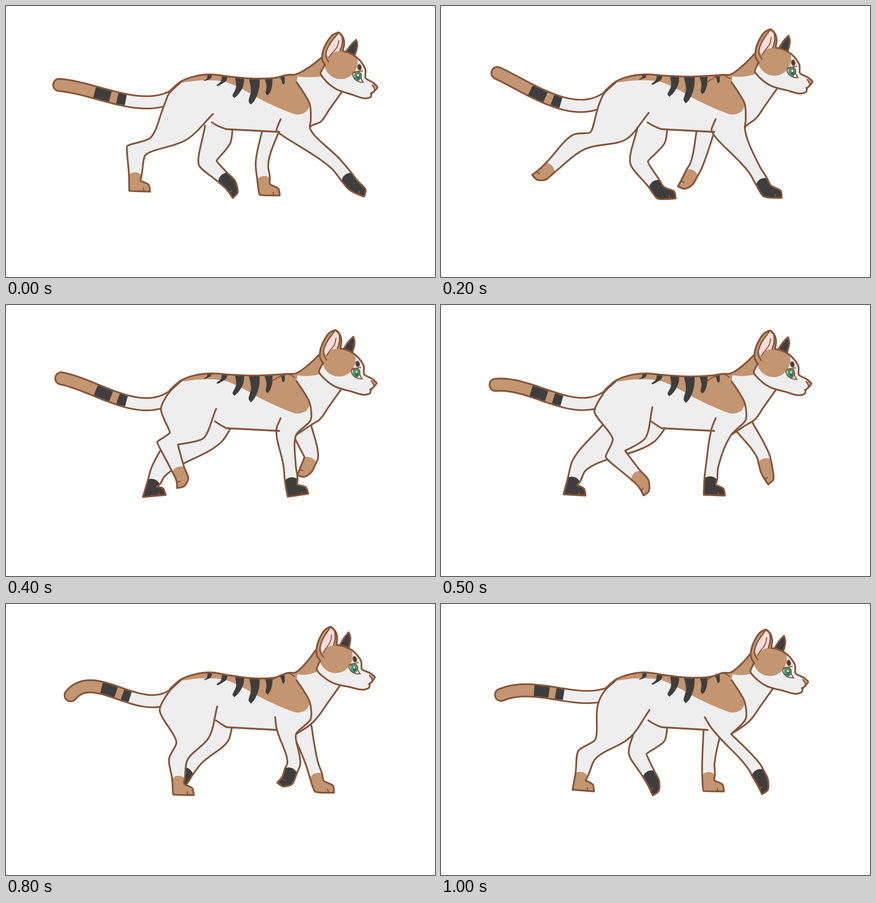
Write an HTML page with a canvas that moves like this. It is 942 px wide and 594 px high and loops after 1100 ms.

```html
<!DOCTYPE html>
<html lang="en">
<head>
<meta charset="utf-8">
<title>Walking cat</title>
<style>
html, body { margin: 0; width: 100%; height: 100%; overflow: hidden; background: #fff; }
canvas { display: block; width: 942px; height: 594px; }
</style>
</head>
<body>
<canvas id="stage" width="942" height="594"></canvas>
<script>
const ctx = document.getElementById('stage').getContext('2d');
const LINE = '#855438', TAN = '#c39570', DARK = '#3e3e3e', FUR = '#eeeeee', PINK = '#fbdcdb';
const STEP = 100, STEPS = 11;

// Key steps of the walk; the steps between are eased.
const keys = [0, 2, 3, 5, 7, 8, 10];

// Leg keys: hock (or wrist) x, y, ball of the paw x, y, toe angle in degrees.
const hindNear = [
  [286,317, 283,394, 3], [303,298, 222,370, 150], [325,283, 318,376, 115], [383,326, 444,390, 65],
  [395,337, 440,404, 3], [378,341, 379,406, 3], [320,331, 303,397, 5]
];
const hindFar = [
  [443,344, 493,392, 58], [435,343, 482,409, 3], [377,369, 363,411, 3], [303,352, 284,405, 3],
  [338,302, 290,382, 160], [415,340, 386,386, 170], [432,328, 467,393, 70]
];
const foreNear = [
  [725,347, 763,393, 28], [688,358, 716,405, 8], [655,350, 671,405, 3], [595,355, 590,405, 3],
  [596,350, 570,373, 162], [632,350, 617,387, 138], [689,358, 706,390, 68]
];
const foreFar = [
  [562,345, 568,402, 4], [560,350, 540,386, 125], [624,342, 595,365, 162], [708,332, 716,365, 62],
  [700,352, 728,400, 6], [672,350, 688,399, 6], [587,350, 588,398, 3]
];
// Ear tip x, y and tilt of the head.
const head = [
  [731,58,3.4], [724,51,0], [724,53,.8], [723,56,.8], [717,53,-.8], [713,50,-2.7], [714,56,-.2]
];
// Tail tip x, y, angle at the tip, depth of the sag.
const tail = [
  [117,173,5,240], [124,147,25,258], [124,147,25,258], [120,175,-5,258],
  [127,179,-35,294], [142,200,-50,258], [132,199,-22,226]
];

function at(rows, step) {
  const k = keys.indexOf(step);
  if (k >= 0) return rows[k];
  const i = keys.findIndex(v => v > step);
  const a = rows[i - 1], b = rows[i], p = rows[(i + 5) % 7], n = rows[(i + 1) % 7];
  return a.map((v, j) => (v + b[j]) / 2 + (v + b[j] - p[j] - n[j]) / 16);
}

const add = (p, d, l) => [p[0] + d[0] * l, p[1] + d[1] * l];
const mix = (a, b, t) => [a[0] + (b[0] - a[0]) * t, a[1] + (b[1] - a[1]) * t];
const polar = deg => [Math.cos(deg * Math.PI / 180), Math.sin(deg * Math.PI / 180)];
const rear = d => [-d[1], d[0]];
function unit(x, y) {
  const l = Math.hypot(x, y) || 1;
  return [x / l, y / l];
}
const heading = (a, b) => unit(b[0] - a[0], b[1] - a[1]);

// Smooth curve that turns into corners where the points bend sharply.
function curve(path, pts, join) {
  const last = pts.length - 1;
  const dirs = pts.slice(1).map((p, i) => heading(pts[i], p));
  const pull = pts.map((p, i) => {
    const u = dirs[Math.max(i - 1, 0)], v = dirs[Math.min(i, last - 1)];
    const c = Math.max(0, u[0] * v[0] + u[1] * v[1]);
    return add([0, 0], unit(u[0] + v[0], u[1] + v[1]), c * .36);
  });
  join ? path.lineTo(...pts[0]) : path.moveTo(...pts[0]);
  for (let i = 0; i < last; i++) {
    const a = pts[i], b = pts[i + 1], l = Math.hypot(b[0] - a[0], b[1] - a[1]);
    path.bezierCurveTo(...add(a, pull[i], l), ...add(b, pull[i + 1], -l), ...b);
  }
  return path;
}
const shape = pts => curve(new Path2D(), pts);
const smooth = (...flat) => shape(flat.filter((v, i) => i % 2 === 0).map((x, i) => [x, flat[2 * i + 1]]));

function fill(path, color) { ctx.fillStyle = color; ctx.fill(path); }
function ink(path, width = 3.8, color = LINE) {
  ctx.strokeStyle = color;
  ctx.lineWidth = width;
  ctx.stroke(path);
}
function oval(x, y, rx, ry, turn = 0) {
  const p = new Path2D();
  p.ellipse(x, y, rx, ry, turn, 0, 7);
  return p;
}

// Rear and front edge points of a joint between two bone directions.
function sides(p, u, v, r) {
  const n = rear(unit(u[0] + v[0], u[1] + v[1]));
  const miter = r * (1 + .3 * (1 - u[0] * v[0] - u[1] * v[1]));
  return [add(p, n, miter), add(p, n, -miter)];
}

// Lower leg and paw around the bones, joined to the upper outline on both ends.
function limb([kx, ky, bx, by, angle], root, girth, color, before, after) {
  const knee = [kx, ky], ball = [bx, by], toe = polar(angle);
  const shin = heading(knee, ball), ankle = add(ball, shin, -24);
  const tip = add(ball, toe, 15 + 15 * Math.max(0, toe[0]));
  const k = sides(knee, heading(root, knee), shin, girth);
  const a = sides(ankle, shin, shin, 14), b = sides(ball, shin, toe, 13);
  const sole = add(add(tip, rear(toe), 11), toe, 4), nail = add(tip, rear(toe), -4);
  const paw = [a[0], b[0], sole, nail, b[1], a[1]];
  const outline = shape([...before, k[0], ...paw, k[1], ...after]);
  const sock = shape(paw);
  sock.quadraticCurveTo(...add(ankle, shin, -11), ...a[0]);
  const split = shape([add(sole, toe, -13), add(add(sole, toe, -15), rear(toe), -6)]);
  return {
    paint() { fill(outline, FUR); fill(sock, color); },
    line() { ink(outline); ink(split, 2.6); }
  };
}

function nearHind(key) {
  const s = key[0] - 290;
  const rump = [348 - s * .12, 215 + s * .2], stifle = [400 + s * .52, 292];
  const groin = [455 + s * .1, 236 - s * .13];
  const calf = mix([key[0], key[1]], [368, 243], .38);
  const leg = limb(key, mix(rump, stifle, .5), 20, TAN,
    [[384, 167], [358, 192], rump, calf], [stifle, groin]);
  return { leg, groin };
}

function farHind(key) {
  const haunch = [360 + (key[0] - 310) * .58, 262], stifle = [413 + key[0] * .18, 300];
  return limb(key, mix(haunch, stifle, .5), 17, DARK, [haunch], [stifle, [498, 262]]);
}

function farFore(key) {
  const x = 562 + (key[0] - 560) * .55;
  const front = [Math.min(x + 45, 682), 254];
  return limb(key, mix([x, 270], front, .5), 13.5, TAN, [[x, 270]], [front]);
}

function drawTail([x, y, angle, sag]) {
  const tip = [x, y], c = [tip, add(tip, polar(angle), 85), [300, sag], [374, 194]];
  const pts = [];
  for (let t = 0; t <= 1.001; t += .05) {
    const u = 1 - t, w = [u * u * u, 3 * u * u * t, 3 * u * t * t, t * t * t];
    pts.push([0, 1].map(k => w.reduce((s, v, i) => s + v * c[i][k], 0)));
  }
  const length = pts.reduce((s, p, i) => i ? s + Math.hypot(p[0] - pts[i - 1][0], p[1] - pts[i - 1][1]) : 0, 0);
  const path = shape(pts);
  const band = (from, to, color) => {
    ctx.setLineDash([0, from * length, (to - from) * length, 999]);
    ink(path, 23.2, color);
  };
  ink(path, 30.6);
  ink(path, 23.2, TAN);
  ctx.lineCap = 'butt';
  band(.53, 1.2, FUR);
  band(.3, .435, DARK);
  band(.495, .567, DARK);
  ctx.setLineDash([]);
  ctx.lineCap = 'round';
}

// Claw-shaped stripes, longest in the middle of the back.
function drawStripes(y) {
  for (let i = 0; i < 6; i++) {
    const bell = Math.exp(-(((i - 2.9) / 1.6) ** 2));
    const x = 447 + 34 * i - .45 * i * i, w = 9 + 16 * bell, h = 8 + 54 * bell;
    const lean = (i - 4) * 5 * Math.min(1, h / 20);
    const p = (side, part, down) => [x + side * w + part * lean, y + down * h];
    const stripe = shape([p(.5, 0, 0), p(.46, .2, .45), p(.2, .8, .85), p(-.08, 1, 1),
      p(-.28, 1, .9), p(-.2, .4, .5), p(-.5, 0, 0)]);
    stripe.lineTo(x - w / 2, y - 10);
    stripe.lineTo(x + w / 2, y - 10);
    fill(stripe, DARK);
  }
}

function drawHead(x, y, tilt) {
  ctx.save();
  ctx.translate(x, y);
  ctx.rotate(tilt * Math.PI / 180);
  ctx.translate(-724, -51);

  const farEar = smooth(741,94, 752,77, 763,65, 766,77, 761,102);
  fill(farEar, DARK);
  ink(farEar);

  const face = smooth(697,124, 689,143, 703,160, 725,175, 760,185, 790,192, 802,188, 804,180,
    809,175, 816,166, 808,158, 788,147, 787,129, 776,112, 766,103, 748,94, 733,91);
  fill(face, FUR);
  ctx.save();
  ctx.clip(face);
  fill(oval(732, 115, 37, 38), TAN);
  ctx.restore();
  fill(smooth(808,159, 815,166, 809,172, 803,162), '#dc9a86');
  ink(face);
  ink(smooth(804,161, 809,169, 809,176, 801,180), 2.6);

  const ear = smooth(698,125, 691,113, 691,96, 699,74, 711,57, 724,51, 733,60, 737,74, 735,91);
  fill(ear, TAN);
  fill(smooth(704,108, 700,98, 706,78, 723,54, 731,62, 727,91, 716,95, 704,108), PINK);
  ink(smooth(705,117, 698,103, 703,82, 722,53), 3);
  ink(smooth(732,60, 733,74, 729,91), 3);
  ink(smooth(725,69, 722,83, 711,98, 705,107), 2.2);
  ink(ear);

  const eye = smooth(761,136, 760,142, 765,151, 774,156, 784,157, 779,149, 778,139, 771,134, 761,136);
  fill(eye, '#fff');
  ctx.save();
  ctx.clip(eye);
  fill(oval(764, 144, 7, 11), '#d5efdf');
  fill(oval(771, 143, 8, 12), '#4b9a75');
  fill(oval(772, 146, 3.6, 6), '#2f6b50');
  fill(oval(771.5, 142.5, 2, 2.4), '#fff');
  ctx.restore();
  ink(eye, 2.4);
  ink(smooth(762,137, 771,134, 781,132), 2.2);
  const spot = oval(773.5, 124.5, 4, 6.2, -.2);
  fill(spot, DARK);
  ink(spot, 1.8);
  ctx.restore();
}

function draw(step) {
  ctx.clearRect(0, 0, 942, 594);
  ctx.lineCap = ctx.lineJoin = 'round';
  const [ex, ey, tilt] = at(head, step);
  const back = 158.5 - 4.5 * Math.cos((step - 3) / STEPS * 2 * Math.PI);
  const slide = 6 * Math.max(0, step - 6);

  const { leg: hind, groin } = nearHind(at(hindNear, step));
  const elbow = [594, 272], chestEnd = step < 4 ? [667, 267] : [637, 285];
  const shoulder = [[667, 215], [656, 194], [638, 167]];
  const fore = limb(at(foreNear, step), mix(elbow, chestEnd, .5), 13.5, DARK,
    [[603 - slide, 248], elbow], [chestEnd, [669, 252], ...shoulder]);

  for (const leg of [farHind(at(hindFar, step)), farFore(at(foreFar, step))]) {
    leg.paint();
    leg.line();
  }
  drawTail(at(tail, step));

  const withers = [618, 151], neck = [636, 150], nape = [ex - 32, ey + 50];
  const top = [[360, 186], [385, 165], [415, 154], [448, 150], [494, (back + 151) / 2], [545, back],
    [592, back - 2], withers, neck, add(mix(neck, nape, .5), [1, 3], 1), nape];
  const along = polar(tilt);
  const chin = add(add([ex, ey], along, 14), rear(along), 130);
  const chest = [chin, add(chin, [-27, 38], 1), add(chin, [-46, 65], 1), [670, 263], chestEnd];
  const belly = new Path2D();
  belly.moveTo(groin[0] - 3, 255);
  belly.quadraticCurveTo(groin[0] + 10, 264, 484, 270);
  belly.lineTo(600 - slide * .6, 276);

  const body = curve(shape(top), chest, true);
  body.lineTo(600 - slide * .6, 276);
  body.lineTo(484, 270);
  body.lineTo(groin[0] - 3, 255);
  body.closePath();

  fill(body, FUR);
  hind.paint();
  fore.paint();

  const patch = shape(top.slice(1));
  patch.lineTo(ex - 22, ey + 94);
  patch.quadraticCurveTo(664, 159, 640, 154);
  curve(patch, [...shoulder.slice().reverse(), [660, 231], [642, 238], [605, 226], [560, 205],
    [512, 179], [480, 166], [430, 163], [385, 168]], true);
  fill(patch, TAN);
  ctx.save();
  ctx.clip(body);
  drawStripes(151 + (back - 154) * .65);
  ctx.restore();

  ink(shape(top));
  ink(shape(chest));
  ink(belly);
  hind.line();
  fore.line();
  if (step) {
    ink(shape([[584, 167], [598, 158], withers]), 2.4);
    ink(shape([withers, [626, 154], [634, 159]]), 2.4);
  }
  drawHead(ex, ey, tilt);
}

let shown = -1;
function tick(now) {
  const step = Math.floor(now / STEP) % STEPS;
  if (step !== shown) draw(shown = step);
  requestAnimationFrame(tick);
}
draw(shown = 0);
requestAnimationFrame(tick);
</script>
</body>
</html>
```
